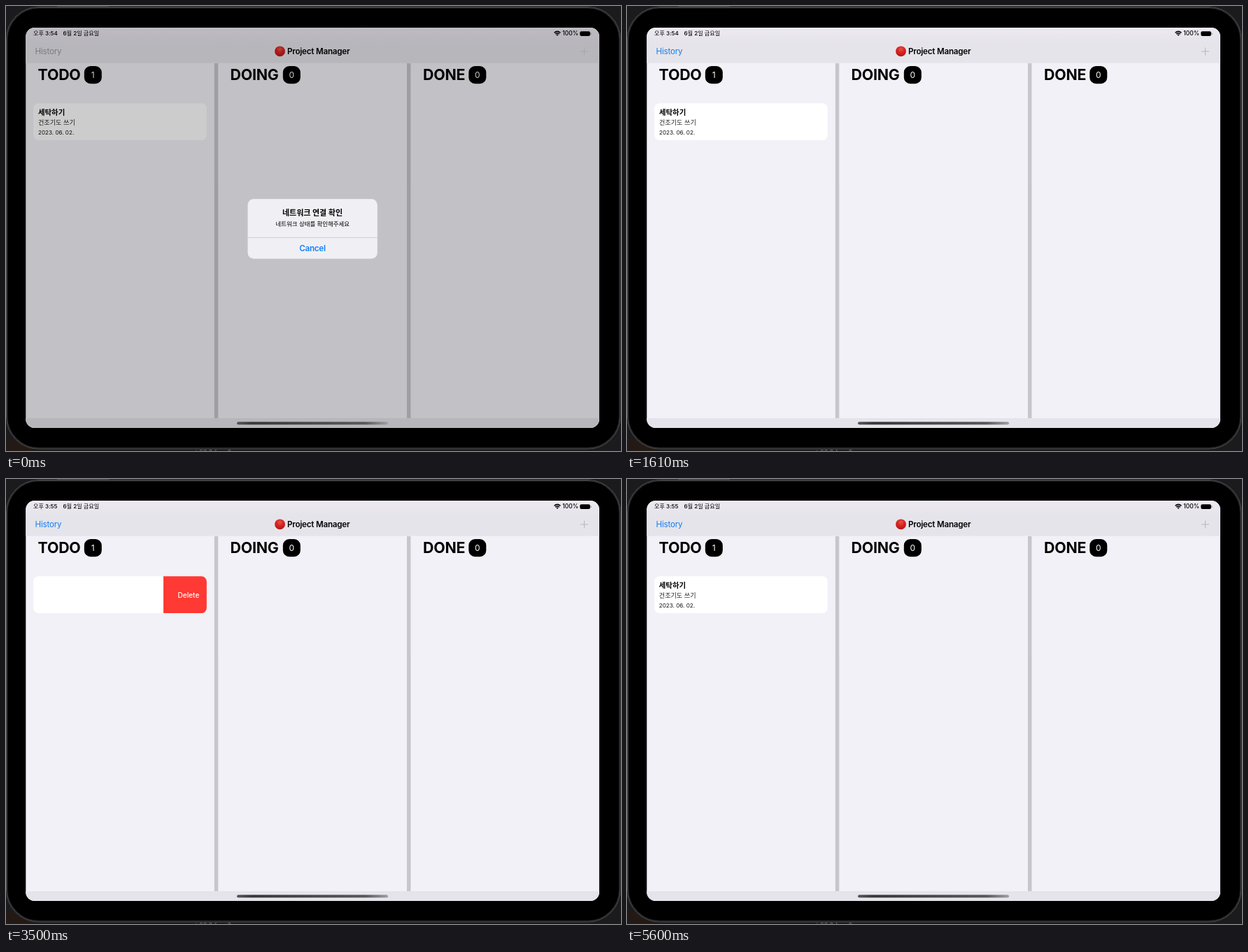
Animation, 879 px wide and 637 px high, one loop 6370 ms. Source, as an HTML page:

```html
<!DOCTYPE html>
<html lang="ko">
<head>
<meta charset="utf-8">
<title>Project Manager</title>
<style>
  html, body { margin: 0; width: 100%; height: 100%; overflow: hidden; background: #1b1b1d; }
  svg { display: block; width: 879px; height: 637px; }
  text { font-family: Inter, "Noto Sans CJK KR", "Noto Sans CJK", sans-serif; }
  .mid { text-anchor: middle; }
  .status { font-size: 8.1px; font-weight: 500; }
  .power { font-size: 8.5px; font-weight: 500; }
  .bar { font-size: 11.6px; letter-spacing: -.2px; }
  .semi { font-weight: 600; }
  .head { font-size: 21.3px; font-weight: 700; letter-spacing: -.2px; }
  .badge { font-size: 12px; fill: #fff; text-anchor: middle; }
  .title { font-size: 10.4px; font-weight: 700; }
  .note { font-size: 9.1px; fill: #222; }
  .date { font-size: 8.1px; fill: #111; }
  .delete { font-size: 10px; font-weight: 500; fill: #fff; }
</style>
</head>
<body>
<svg viewBox="0 0 879 637">
  <defs>
    <clipPath id="screen"><rect x="28.3" y="31" width="819.6" height="573" rx="12.5"/></clipPath>
    <clipPath id="row"><rect x="39.1" y="139.3" width="247.7" height="52.8" rx="7.5"/></clipPath>
    <linearGradient id="nav" x2="0" y2="1">
      <stop offset="0" stop-color="#ede9f1"/>
      <stop offset=".45" stop-color="#e5e4ea"/>
    </linearGradient>
    <radialGradient id="ball" cx=".5" cy=".3" r=".7">
      <stop offset="0" stop-color="#ec5048"/>
      <stop offset=".5" stop-color="#d6231f"/>
      <stop offset="1" stop-color="#b41818"/>
    </radialGradient>
    <linearGradient id="home">
      <stop offset="0" stop-color="#58585c"/>
      <stop offset=".1" stop-color="#39393c"/>
      <stop offset=".85" stop-color="#59595c"/>
      <stop offset="1" stop-color="#a0a0a4"/>
    </linearGradient>
  </defs>

  <!-- desktop and tablet -->
  <rect width="879" height="637" fill="#1b1b1d"/>
  <path d="M73 .5H147" stroke="#3a3a3c"/>
  <rect y="620" width="40" height="17" fill="#241a15"/>
  <text x="249" y="641.5" font-size="9" fill="#77777a">run at 60.0 fps, 0 &#160; &#160; ms</text>
  <rect x=".5" y="1.5" width="877.5" height="632.5" rx="46" stroke="#58585a"/>
  <rect x="1.7" y="2.7" width="875.1" height="630.1" rx="45" stroke="#2c2c2e" stroke-width="1.5"/>

  <g clip-path="url(#screen)">
    <rect x="28" y="31" width="820" height="573" fill="#f2f1f7"/>
    <rect x="28" y="31" width="820" height="50.7" fill="url(#nav)"/>
    <rect x="28" y="590" width="820" height="14" fill="#e5e4ea"/>
    <path d="M300.5 82V590M575.7 82V590" stroke="#c7c7cb" stroke-width="5.5"/>

    <text class="status" x="39" y="42">오후 <tspan id="clock">3:54</tspan></text>
    <text class="status" x="81.5" y="42">6월 2일 금요일</text>
    <g fill="none" stroke="#000" stroke-width="1.5">
      <path d="M783.6 38.4Q788 34.4 792.4 38.4M785.2 40.3Q788 37.8 790.8 40.3"/>
      <path d="M786.4 41L788 43L789.6 41Q788 39.8 786.4 41Z" fill="#000" stroke="none"/>
    </g>
    <text class="power" x="795.3" y="42.2">100%</text>
    <rect x="820.3" y="36.2" width="14.6" height="6.8" rx="2"/>
    <rect x="835.6" y="38.4" width="1" height="2.4" rx=".5" fill="#777"/>

    <text id="history" class="bar" x="41.5" y="69">History</text>
    <circle cx="391.5" cy="64.8" r="7.4" fill="url(#ball)"/>
    <text class="bar semi" x="402" y="69">Project Manager</text>
    <path id="plus" d="M821 65H832M826.5 59.5V70.5"/>

    <g id="heads"></g>

    <g clip-path="url(#row)">
      <g id="card">
        <rect x="39" y="139" width="248" height="54" fill="#fff"/>
        <rect id="press" x="39" y="139" width="248" height="54" fill="#d2d1d6"/>
        <text class="title" x="46" y="156.3">세탁하기</text>
        <text class="note" x="46" y="170">건조기도 쓰기</text>
        <text class="date" x="46" y="183.5">2023. 06. 02.</text>
      </g>
      <rect id="red" y="139" width="300" height="54" fill="#ff3933"/>
      <text id="label" class="delete" y="169.6">Delete</text>
    </g>

    <rect id="dim" x="28" y="31" width="820" height="573"/>
    <rect x="330" y="595.2" width="216" height="4" rx="2" fill="url(#home)"/>

    <g id="alert">
      <rect x="345.5" y="276.2" width="185.3" height="85.6" rx="8.5" fill="#f0f0f4"/>
      <path d="M345.5 331.5H530.8" stroke="#cfcfd4"/>
      <text class="mid" x="438" y="300.3" font-size="11" font-weight="700">네트워크 연결 확인</text>
      <text class="mid" x="438.3" y="314.6" font-size="8.45">네트워크 상태를 확인해주세요</text>
      <text class="bar semi mid" x="438" y="351" fill="#157efb">Cancel</text>
    </g>
  </g>
</svg>
<script>
const LOOP = 6370, STEP = 70;
const RIGHT = 287, LEFT = 39, REST = 51, AWAY = 300, PAD = 9.6;
const $ = id => document.getElementById(id);
const set = (id, attr, value) => $(id).setAttribute(attr, value);

// Critically damped spring from 0 to 1
const spring = (ms, speed) => {
  const x = Math.max(0, ms) / 1000 * speed;
  return 1 - (1 + x) * Math.exp(-x);
};
const mix = (a, b, p) => a + (b - a) * p;
const blend = (a, b, p) => `rgb(${a.map((v, i) => Math.round(mix(v, b[i], p)))})`;

$('heads').innerHTML = [['TODO', 46, 112, 1], ['DOING', 321, 396, 0], ['DONE', 596.5, 661.5, 0]]
  .map(([name, x, bx, count]) => `
    <text class="head" x="${x - 0.4}" y="106.3">${name}</text>
    <rect x="${bx - 0.2}" y="86" width="25" height="25.2" rx="9"/>
    <text class="badge" x="${bx + 12.3}" y="103">${count}</text>`).join('');

// Card shift, left edge of the red button and of its label
function swipe(t) {
  if (t < 3290) return [0, RIGHT + 1, RIGHT + 20];
  if (t >= 4620) {
    const s = 1 - spring(t - 4616, 9.7), red = RIGHT - REST * s;
    return [-AWAY * s, t < 5600 ? red : RIGHT + 1, red + PAD];
  }
  const snap = 3895;
  const drag = 0.25 * (Math.min(t, snap) - 3252);
  const pull = mix(drag, AWAY, spring(t - snap, 10));
  const red = Math.max(LEFT, RIGHT - pull);
  const pinned = Math.max(red, RIGHT - REST) + PAD;
  return [-pull, red, mix(pinned, red + PAD, spring(t - snap, 14))];
}

function draw(t) {
  const fade = t < 1610 ? spring(t - 1195, 18) : 1;
  set('dim', 'opacity', 0.2 * (1 - fade));
  set('alert', 'opacity', 1 - fade);
  set('history', 'fill', blend([154, 154, 158], [21, 126, 238], fade));
  set('plus', 'stroke', blend([208, 207, 212], [184, 183, 188], fade));

  set('press', 'opacity', t < 2590 || t >= 2800 ? 0 : t < 2730 ? 1 : 0.45);
  $('clock').textContent = t < 3290 ? '3:54' : '3:55';

  const [card, red, label] = swipe(t);
  set('card', 'transform', `translate(${card.toFixed(2)} 0)`);
  set('red', 'x', red);
  set('label', 'x', label);
}

const start = performance.now();
function tick() {
  const t = (performance.now() - start) % LOOP;
  draw(Math.floor(t / STEP) * STEP);
  requestAnimationFrame(tick);
}
tick();
</script>
</body>
</html>
```
